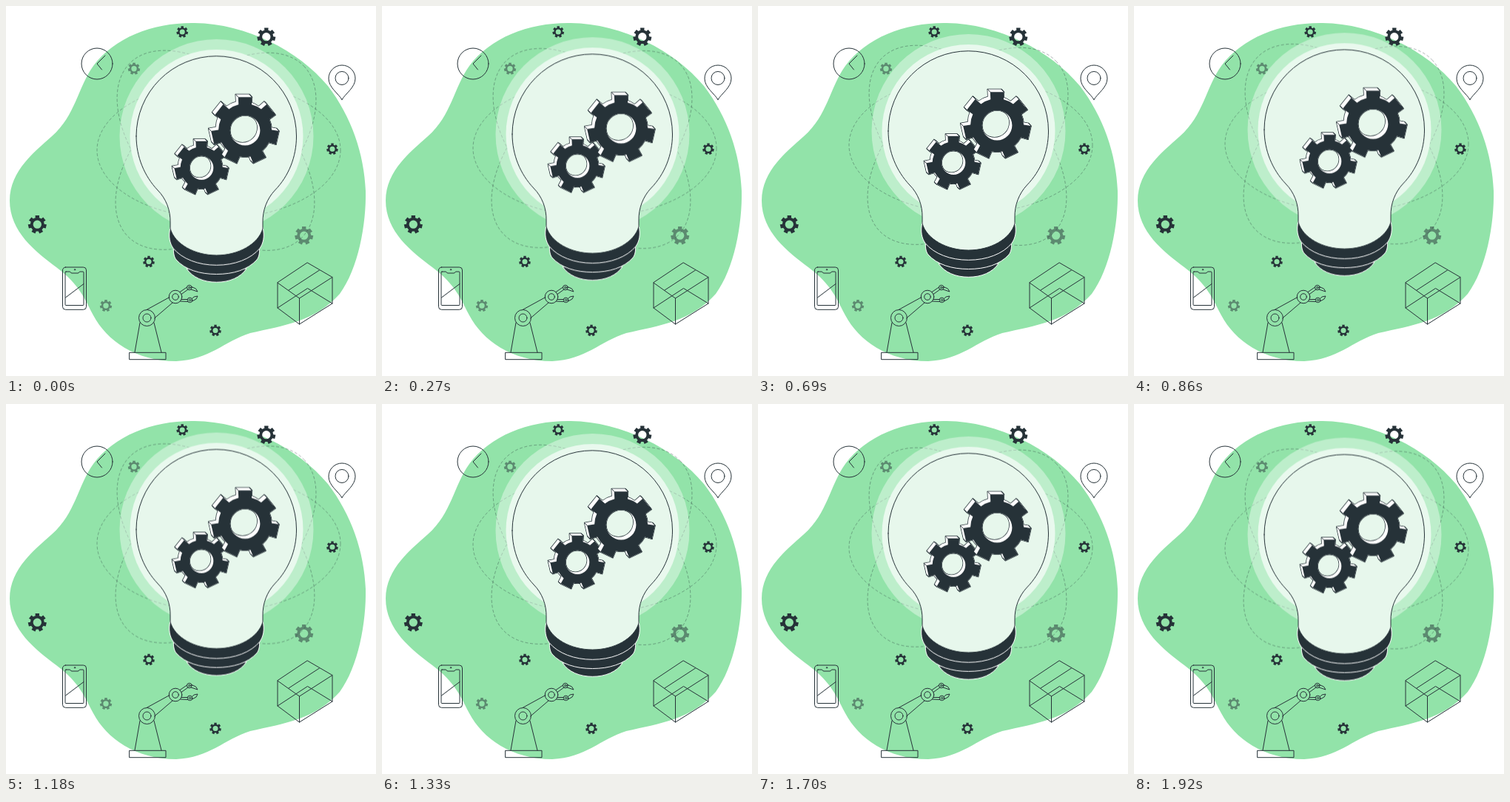
An HTML page that plays this animation: 500 by 500 pixels, repeating every 1970 ms.

```html
<!DOCTYPE html>
<html lang="en">
<head>
<meta charset="utf-8">
<title>Idea bulb</title>
<style>
  html, body { margin: 0; width: 100%; height: 100%; overflow: hidden; background: #fff; }
  svg { display: block; width: 100%; height: 100%; }
  .line { fill: none; stroke: #263238; stroke-width: 1; stroke-linecap: round; stroke-linejoin: round; }
  .orbit { fill: none; stroke: #263238; stroke-opacity: .4; stroke-width: .9; stroke-dasharray: 4 2.6; }
  .cap { fill: #263238; stroke: #fff; stroke-width: 1; }
  .dark { fill: #263238; fill-rule: evenodd; }
  .faded { fill: #263238; fill-opacity: .5; fill-rule: evenodd; }
  .float { animation: float 1.97s linear -.075s infinite; }
  @keyframes float {
    0%, 100% { transform: translateY(.75px); }
    50% { transform: translateY(-9.25px); }
  }
</style>
</head>
<body>
<svg viewBox="0 0 500 500">
  <path fill="#92e3a9" d="M255 23C200 22 147 42 118 81C97 110 94 148 62 176C40 196 5 222 5 263C5 305 40 332 68 353C100 377 107 397 118 418C136 452 175 480 230 480C275 478 295 453 330 442C375 432 418 426 451 389C476 355 487 295 486 250C484 200 467 150 435 108C395 60 325 24 255 23Z"/>

  <g id="decor"></g>

  <g class="line">
    <!-- clock -->
    <circle cx="123" cy="78" r="21"/>
    <path d="M134 67L123 78L129.500 86"/>
    <!-- pin -->
    <path d="M454 126.500C449 118 436 110 436 98A18 18 0 0 1 472 98C472 110 459 118 454 126.500Z"/>
    <circle cx="454" cy="97.500" r="9"/>
    <!-- phone -->
    <rect x="76.500" y="353" width="32" height="57.300" rx="4"/>
    <path d="M81 359H86.500Q87.500 361 89 361H97Q98.500 361 99.500 359H104Q105 359 105 360V403.500Q105 404.500 104 404.500H81Q80 404.500 80 403.500V360Q80 359 81 359ZM80.500 394L105 375.500"/>
    <circle cx="93" cy="356.300" r=".7"/>
    <!-- parcel -->
    <path d="M407.500 347L441 366.500V402L396.500 430L367 408V374ZM367 374L396.500 395L441 366.500M396.500 395V430M382 384L423.500 357M367 408L407.500 381.500L441 402"/>
    <!-- robot arm -->
    <rect x="167" y="468.300" width="49" height="9.400"/>
    <path d="M181 428L174 468M200 428L210 468M190 410.500L221 393.500M200.500 422L225 401"/>
    <circle cx="190.500" cy="421.500" r="11"/>
    <circle cx="190.500" cy="421.500" r="5.500"/>
    <circle cx="229" cy="393" r="8.800"/>
    <circle cx="229" cy="393" r="4.300"/>
    <path d="M235 386.500L244.500 380M237 389.500L246 383M237 396.500L245 396.500M235.500 399L245.500 399.500"/>
    <circle cx="247.800" cy="380.500" r="3.300"/>
    <circle cx="247.800" cy="380.500" r="1.300"/>
    <circle cx="248.500" cy="397.400" r="3.300"/>
    <circle cx="248.500" cy="397.400" r="1.300"/>
    <path d="M251 379.500L256.500 382L259 386L250 383M251.500 395.500L254 393L259 392L257 396L251.500 399"/>
  </g>

  <g class="float">
    <g class="orbit">
      <ellipse cx="287.500" cy="195" rx="164.500" ry="92"/>
      <ellipse rx="165.500" ry="93" transform="translate(283.500 195.300) rotate(45.700)"/>
      <ellipse rx="165.500" ry="93" transform="translate(283.500 196.300) rotate(-44)"/>
    </g>
    <circle cx="284.500" cy="176" r="131" fill="#fff" fill-opacity=".4"/>
    <circle cx="284.500" cy="176" r="117" fill="#e9f9ee"/>

    <path class="cap" d="M244 355C252 367 267 373.300 284.500 373.300S317 367 325 355Z"/>
    <path class="cap" d="M226.500 326C226 334 227 339 230 343C242 356.500 262 362.500 284.500 362.500S327 356.500 339 343C342 339 343 334 342.500 326Z"/>
    <path class="cap" d="M222 299C219 312 221.500 321 226 327.500C238 342 260 350.300 284.500 350.300S331 342 343 327.500C347.500 321 350 312 347 299Z"/>
    <path class="line" style="fill:#e7f7ec" d="M176 176A108.250 108.250 0 0 1 392.500 176C392.500 204 382 230 363.500 249C353 260 346.500 276 347 293V301C341 322 314 337 284.500 337S228 322 222 301V293C222.500 276 216 260 205 249C187 230 176 204 176 176Z"/>
    <g id="wheels"></g>
  </g>
</svg>
<script>
  const TEETH = 7;
  const svgNS = 'http://www.w3.org/2000/svg';

  function add(parent, tag, attrs) {
    const node = document.createElementNS(svgNS, tag);
    for (const key in attrs) node.setAttribute(key, attrs[key]);
    parent.appendChild(node);
    return node;
  }

  const rotate = (x, y, a) => [x * Math.cos(a) - y * Math.sin(a), x * Math.sin(a) + y * Math.cos(a)];
  const xy = p => p.map(v => v.toFixed(2)).join(' ');

  // Corners of every tooth around the origin, the first one pointing up.
  function toothCorners(tip, body, half) {
    const root = -Math.sqrt(body * body - half * half);
    return Array.from({ length: TEETH }, (_, i) =>
      [[-half, root], [-half * 1.06, -tip], [half * 1.06, -tip], [half, root]]
        .map(([x, y]) => rotate(x, y, i * 2 * Math.PI / TEETH)));
  }

  function gearPath(teeth, body, hole) {
    const rim = teeth.map((t, i) =>
      (i ? `A${body} ${body} 0 0 1 ` : 'M') + t.map(xy).join('L')).join('');
    return `${rim}A${body} ${body} 0 0 1 ${xy(teeth[0][0])}Z` +
      `M${hole} 0A${hole} ${hole} 0 1 0 ${-hole} 0A${hole} ${hole} 0 1 0 ${hole} 0Z`;
  }

  function smallGear(x, y, r, kind) {
    const body = r * .76;
    add(decor, 'path', {
      class: kind, transform: `translate(${x} ${y})`,
      d: gearPath(toothCorners(r, body, r * .21), body, r * .46)
    });
  }

  function thickGear(x, y, tip, body, half, hole, dx, dy) {
    const g = add(wheels, 'g', { transform: `translate(${x} ${y})` });
    const teeth = toothCorners(tip, body, half);
    const d = gearPath(teeth, body, hole);
    const layers = style => {
      for (let i = 0; i <= 6; i++) {
        add(g, 'path', { d, transform: `translate(${dx * (1 - i / 6)} ${dy * (1 - i / 6)})`, ...style });
      }
    };
    layers({ fill: 'none', stroke: '#263238', 'stroke-width': 1.5, 'stroke-linejoin': 'round' });
    layers({ fill: '#fff', 'fill-rule': 'evenodd' });
    const edges = teeth.map(t => [t[1], t[2]].map(([px, py]) =>
      `M${xy([px + dx, py + dy])}L${xy([px, py])}`).join('')).join('');
    add(g, 'path', { d: edges, class: 'line' });
    add(g, 'path', { d, class: 'dark' });
  }

  const decor = document.getElementById('decor');
  const wheels = document.getElementById('wheels');

  [[42.3, 295.2, 12.3], [351.8, 41.7, 12.3], [238.2, 35, 7.7], [193, 345.5, 7.7],
   [283, 438.5, 7.7], [441, 193.3, 7.7]].forEach(g => smallGear(...g, 'dark'));
  [[173, 84.7, 8], [402.7, 310.2, 12.3], [135, 405, 8]].forEach(g => smallGear(...g, 'faded'));

  thickGear(264.2, 218.8, 36, 28.5, 7.4, 16.1, -3, -2.7);
  thickGear(323.1, 168.2, 45, 36, 8.8, 20.3, -3.5, -3.7);
</script>
</body>
</html>
```
